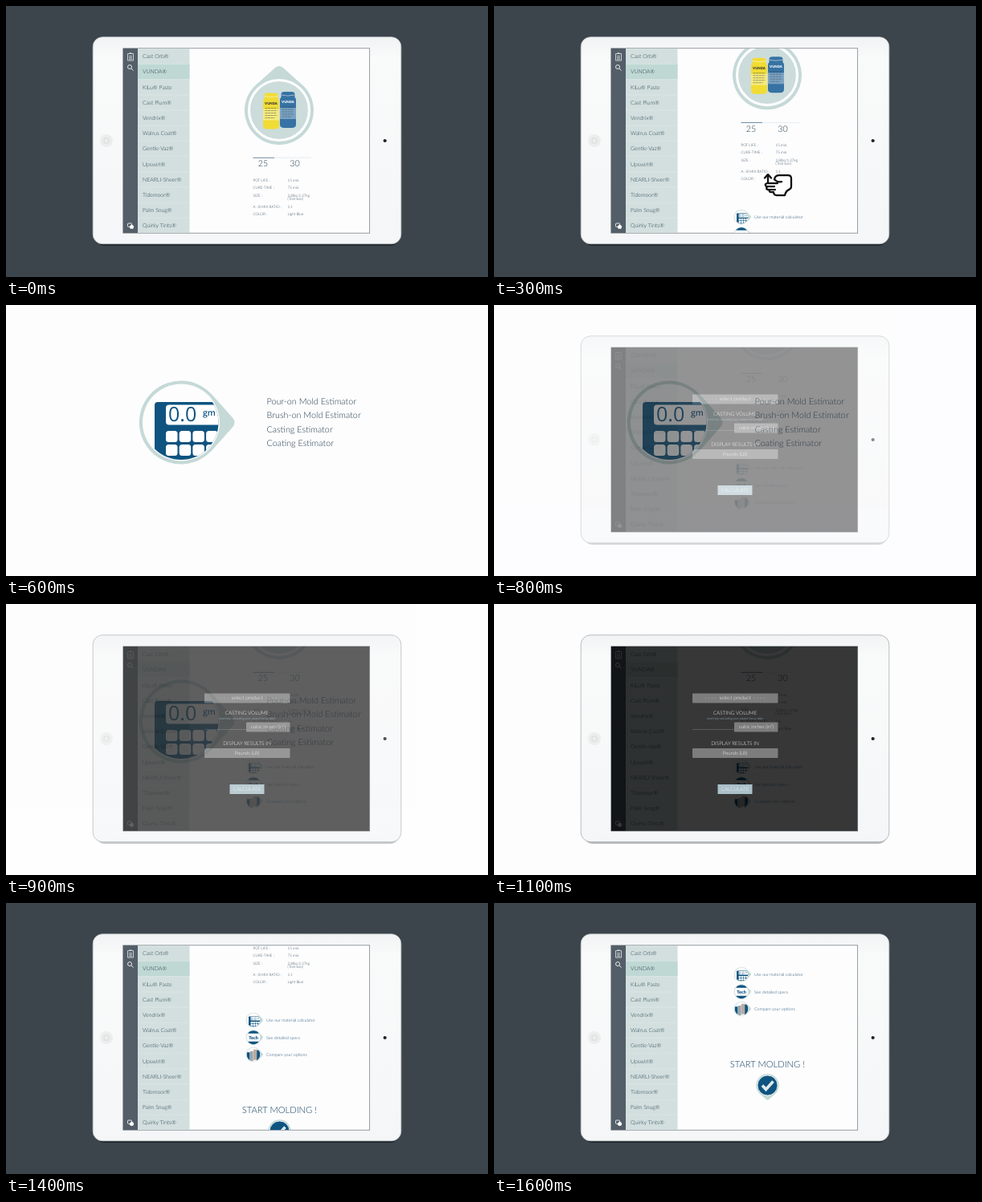
Write an HTML page that moves like this. It is 600 by 338 pixels and loops after 1.7 s.

```html
<!DOCTYPE html>
<html lang="en">
<head>
<meta charset="utf-8">
<title>Material calculator on a tablet</title>
<style>
  html, body { margin: 0; height: 100%; overflow: hidden; background: #3c444c; }
  svg { display: block; width: 100vw; height: 100vh; }
  text {
    font: 300 6.4px Lato, sans-serif; fill: #1f3a4a;
    dominant-baseline: middle; text-rendering: geometricPrecision;
  }
  .mid { text-anchor: middle; }
  #names text { font-size: 6.9px; }
  #specs text { font-size: 4.6px; }
  #links text { font-size: 5.3px; fill: #0f4468; }
  #list text { font-size: 10.8px; }
  #modal text { fill: #fff; dominant-baseline: central; }
  .pale { fill: #c5d9d7; }
  .blue { fill: #0f5480; }
  .line { fill: none; stroke: #e4e8ea; stroke-width: 1; }
</style>
</head>
<body>
<svg viewBox="0 0 600 338">
  <defs>
    <clipPath id="screen"><rect x="146" y="53" width="306.500" height="230"/></clipPath>
    <clipPath id="disc"><circle r="46.500"/></clipPath>
    <linearGradient id="shell" x2="0" y2="1">
      <stop stop-color="#f1f3f4"/><stop offset=".1" stop-color="#f9fafa"/><stop offset="1" stop-color="#f5f6f7"/>
    </linearGradient>
    <path id="drop" d="M40-33 64-6Q69 0 64 6L40 33A52 52 0 1 1 40-33Z"/>
    <g id="badge"><use href="#drop" class="pale"/><circle r="48" fill="#fdfdfe"/></g>
    <g id="calculator">
      <use href="#badge"/>
      <g clip-path="url(#disc)">
        <rect x="-33" y="-25.500" width="110" height="90" rx="4" class="blue"/>
        <rect x="-19" y="-22" width="80" height="25" rx="4" fill="#fff"/>
        <g id="keys" fill="#fff"></g>
        <text x="-16" y="-8" style="font:400 25px 'Open Sans',sans-serif;fill:#0f5480">0.0</text>
        <text x="27" y="-11.500" style="font:600 10.500px 'Open Sans',sans-serif;fill:#0f5480">gm</text>
      </g>
    </g>
    <g id="bottle">
      <path d="M2 3Q2 0 6 0H15Q19 0 19 3V7Q20.500 8 20.500 10V41Q20.500 45 15 45H6Q.5 45 .5 41V10Q.5 8 2 7Z"/>
      <path d="M2 4Q10 6 19 4" fill="none" stroke="#fff" stroke-opacity=".5"/>
      <path d="M.5 20H20.500V34H.5Z" fill="#fff" fill-opacity=".35"/>
      <path d="M3 19H18M3 22H18M3 25H17M3 28H18M3 31H15" stroke="#263743" stroke-width=".8" stroke-opacity=".55" stroke-dasharray="3 .6"/>
    </g>
  </defs>

  <rect id="backdrop" width="600" height="338"/>
  <rect id="shadow" x="111" y="44" width="379" height="255" rx="12" fill="#20272b"/>
  <rect id="body" x="108.200" y="38.700" width="383.600" height="258" rx="12" fill="url(#shell)" stroke-width=".8"/>
  <circle cx="125" cy="168" r="8" fill="#eceded"/>
  <rect x="122" y="165" width="6" height="6" rx="1.500" fill="none" stroke="#d0d2d3" stroke-width=".8"/>
  <circle cx="471.700" cy="168" r="2.100" fill="#20242a"/>
  <rect x="145.700" y="52.800" width="307" height="230.400" fill="#fdfdfe" stroke="#6d757b" stroke-width=".7"/>

  <g clip-path="url(#screen)">
    <rect x="146" y="53" width="18" height="230" fill="#545e68"/>
    <rect x="164" y="53" width="64.500" height="230" fill="#d2dfde"/>
    <rect x="164" y="72.500" width="64.500" height="18.500" fill="#bfd8d4"/>
    <g class="line">
      <path d="M151.500 59.500H158.500V68H151.500ZM153.500 58.700H156.500M153 62.500H157M153 64.500H157M153 66.300H157" stroke-width=".8"/>
      <circle cx="154" cy="76" r="2.500"/><path d="M156 78 158.500 80.500"/>
      <rect x="151.500" y="271" width="5" height="4.500" rx="1"/>
    </g>
    <circle cx="156.500" cy="275.500" r="2.500" fill="#fff"/>
    <g id="names"></g>

    <g id="page">
      <g transform="translate(340 130)">
        <use href="#drop" class="pale" transform="rotate(-90) scale(.827)"/>
        <circle r="37.500" fill="#cbdcda" stroke="#fdfdfe" stroke-width="3.200"/>
        <use href="#bottle" x="-20.500" y="-21.500" fill="#f1dc35"/>
        <use href="#bottle" x="0.500" y="-23" fill="#3672a3"/>
        <text class="mid" x="-10" y="-8.500" style="font-size:4.300px;font-weight:900;fill:#333">VUNDA</text>
        <text class="mid" x="11" y="-10" style="font-size:4.300px;font-weight:900;fill:#fff">VUNDA</text>
      </g>
      <path d="M334 189.300H380" stroke="#dfe7ea" stroke-width=".7"/>
      <path d="M307.500 189.300H334" stroke="#6f8da0"/>
      <text class="mid" x="320" y="197.700" style="font-size:10.700px">25</text>
      <text class="mid" x="359.500" y="197.700" style="font-size:10.700px">30</text>
      <g id="specs"></g>
      <g id="links">
        <use href="#calculator" transform="translate(308 307) scale(.18)"/>
        <g transform="translate(308 328.700) scale(.18)">
          <use href="#badge"/>
          <path d="M-38-28A47 47 0 0 1 38-28ZM-38 28A47 47 0 0 0 38 28Z" class="blue"/>
          <text class="mid" y="4" style="font-size:31px;font-weight:900;fill:#0f5480">Tech</text>
        </g>
        <g transform="translate(308 350) scale(.18)">
          <use href="#badge"/>
          <g clip-path="url(#disc)">
            <path d="M-48-15H-25V48H-48ZM22-30H48V48H22Z" class="blue"/>
            <path d="M-24-22H-2V44H-24Z" fill="#9aa6ab"/><path d="M0-35H24V38H0Z" fill="#b9aba0"/>
          </g>
        </g>
        <text x="324" y="307.800">Use our material calculator</text>
        <text x="324" y="329.200">See detailed specs</text>
        <text x="324" y="350.800">Compare your options</text>
      </g>
      <text class="mid" x="340.500" y="420.200" style="font-size:11.200px;fill:#0f3f60">START MOLDING !</text>
      <g transform="translate(340.500 445.500)">
        <use href="#drop" class="pale" transform="rotate(90) scale(.275)"/>
        <circle r="12.500" class="blue" stroke="#fff" stroke-width=".8"/>
        <path d="M-6.500 0-2 5 7-5" fill="none" stroke="#dfeaec" stroke-width="3.600"/>
      </g>
    </g>

    <g id="hand" fill="#fff" stroke="#111" stroke-width="2.300" stroke-linejoin="round" stroke-linecap="round">
      <path d="M-12-1V-12.500M-16-8.500-12-13-8-8.500" fill="none"/>
      <path d="M-4-7Q-3-12 2-12H13Q17-12 17-8V2Q17 5 14 6Q10 8 9 13H-1Q-5 13-5 9H-8Q-11 9-10 6H-12Q-15 5-13 2H-14Q-17-1-13-2H0"/>
      <path d="M-13 2H-4M-10 6H-3M-4-7Q-1-3 5-4" fill="none"/>
    </g>

    <g id="modal">
      <rect x="146" y="53" width="307" height="230" fill-opacity=".78"/>
      <g fill="#7d7d7d">
        <rect x="247" y="111.500" width="106.500" height="12" rx="1"/>
        <rect x="299" y="147.500" width="54.500" height="12" rx="1"/>
        <rect x="247" y="180" width="106.500" height="12" rx="1"/>
        <rect x="247" y="156" width="52" height=".5"/>
      </g>
      <rect x="278.500" y="225" width="43" height="12" fill="#a9c0c8"/>
      <g class="mid">
        <text x="300" y="117.500">- - - -&#160; select product &#160;- - - -</text>
        <text x="300" y="136">CASTING VOLUME</text>
        <text x="300" y="142.700" style="font-size:3.500px;fill:#b9e0ec">need help calculating your volume? let us help!</text>
        <text x="326.500" y="153.500" style="font-size:6px">cubic inches (in³)</text>
        <text x="300" y="174.500">DISPLAY RESULTS IN</text>
        <text x="300" y="186" style="font-size:6px">Pounds (LB)</text>
        <text x="300" y="231">CALCULATE</text>
      </g>
    </g>
  </g>

  <g id="estimator">
    <rect width="600" height="338" fill="#fdfdfe"/>
    <use href="#calculator" x="218" y="146.500"/>
    <g id="list"></g>
  </g>
</svg>

<script>
const $ = id => document.getElementById(id);
const label = (x, y, text) => `<text x="${x}" y="${y}">${text}</text>`;

$('names').innerHTML = ['Cast Orb®', 'VUNDA®', 'KiLu® Paste', 'Cast Plum®', 'Vendrix®', 'Walrus Coat®',
  'Gentle-Vaz®', 'Upswirl®', 'NEARLI-Sheer®', 'Tidemoor®', 'Palm Snug®', 'Quirky Tints®']
  .map((name, i) => label(170, 63.5 + 19.2 * i, name) +
    `<path d="M164 ${72.5 + 19.2 * i}H228.500" stroke="#dde8e7" stroke-width=".6"/>`).join('');

$('specs').innerHTML = [
  [217.5, 'POT LIFE :', '15 min.'], [227, 'CURE-TIME :', '75 min.'], [236.5, 'SIZE :', '2.8lbs/1.27kg'],
  [241, '', '(Trial Size)'], [250.5, 'A : B MIX RATIO :', '1:1'], [260, 'COLOR :', 'Light Blue']
].map(([y, key, value]) => label(307.5, y, key) + label(350.5, y, value)).join('');

$('list').innerHTML = ['Pour-on Mold', 'Brush-on Mold', 'Casting', 'Coating']
  .map((kind, i) => label(324.5, 121.7 + 17.1 * i, kind + ' Estimator')).join('');

$('keys').innerHTML = Array.from({ length: 8 }, (_, i) =>
  `<rect x="${-19 + i % 4 * 16.7}" y="${10.5 + (i >> 2) * 17}" width="14.500" height="14" rx="3.500"/>`).join('');

const clamp = v => Math.max(0, Math.min(1, v));
const smooth = v => (v = clamp(v), v * v * (3 - 2 * v));
const show = (id, on) => $(id).style.opacity = +on;

function draw(now) {
  const t = Math.floor(now % 1700 / 100) * 100;
  const calculating = t >= 600 && t < 1200;
  const scroll = 104 * smooth((t - 100) / 447) + 114 * smooth((t - 1200) / 400);

  $('backdrop').setAttribute('fill', calculating ? '#fdfdfe' : '#3c444c');
  $('shadow').setAttribute('fill', calculating ? '#b4b8ba' : '#20272b');
  $('body').setAttribute('stroke', calculating ? '#a9adb0' : '#c3c8cb');
  $('page').setAttribute('transform', `translate(0 ${-scroll})`);
  $('hand').setAttribute('transform', `translate(353 ${223 - (scroll - 44) * .6})`);
  show('hand', t >= 200 && t <= 400);
  show('modal', calculating);
  show('estimator', t < 600 ? clamp((t - 400) / 200) : clamp(1 - (t - 600) / 375));
  requestAnimationFrame(draw);
}
draw(0);
</script>
</body>
</html>
```
